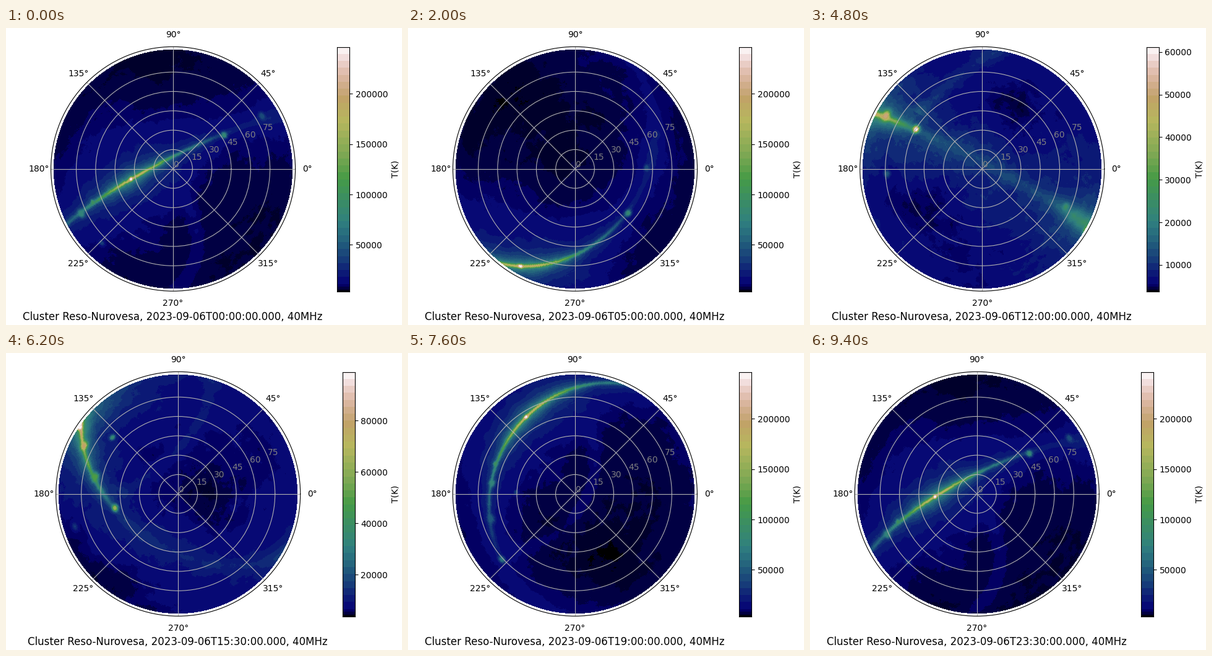
These frames come from a looping animation (640x480 px, 9.6 s). A matplotlib script:

```python
import numpy as np
import matplotlib.pyplot as plt
from matplotlib.animation import FuncAnimation
from matplotlib.colors import ListedColormap
from matplotlib.ticker import MaxNLocator

W, H, DPI = 640, 480, 100
FRAMES, STEP_MS = 48, 200
LAT = np.radians(3.5)
LST0 = 18.33            # sidereal hour of the first frame
PX_PER_DEG = 2.087
CENTER_Y, AXES_R, DISK_R = 227.75, 197.5, 193.2
SIDE = 388              # pixels across the sky image
T_MIN, T_MAX = 3800, 246700
GRID = 720              # columns of the sky map, half a degree each

# Contour bands as fractions of the temperature range: fine at the cold end.
EDGES = np.concatenate([[0, 0.0039, 0.0098, 0.0195], np.linspace(0.03, 1, 35)])
PALETTE = plt.get_cmap("gist_earth")((EDGES[1:] + EDGES[:-1]) / 2)

# Directions of the galactic pole and centre: right ascension, declination.
POLE, CORE = (192.86, 27.13), (266.4, -28.94)

# Compact sources: right ascension (h), declination, peak (K), width (deg).
SOURCES = [(17.76, -29, T_MAX, 0.9), (15.75, -56, 99000, 0.9),
           (14.3, -60.5, 79000, 1.5), (20.5, 40.8, 81400, 1.5),
           (8.97, -45, 61200, 1.5), (11.3, -59.8, 50000, 1.8),
           (23.45, 58.8, 45000, 1.4), (13.5, -42.2, 36000, 1.2)]


def unit(lon, lat):
    """Unit vectors for angles in degrees."""
    lon, lat = np.radians(lon), np.radians(lat)
    return np.stack([np.cos(lat) * np.cos(lon), np.cos(lat) * np.sin(lon),
                     np.sin(lat) + 0 * lon], axis=-1)


def distance(vecs, center):
    return np.degrees(np.arccos(np.clip(vecs @ center, -1, 1)))


def bump(x, center, width):
    return np.exp(-((x - center) / width) ** 2)


def sphere_noise(vecs, rng, waves=110):
    """Isotropic ragged noise built from plane waves, unit variance."""
    total = np.zeros(vecs.shape[:-1])
    for k in np.geomspace(4, 130, waves):
        direction = rng.normal(size=3)
        direction *= k / np.linalg.norm(direction)
        total += k ** -0.4 * np.cos(vecs @ direction + rng.uniform(0, 2 * np.pi))
    return total / total.std()


def ridge_height(lon):
    """Temperature excess along the galactic plane."""
    return 1000 * (2 + 165 * bump(lon, 0, 38) + 31 * bump(np.abs(lon), 65, 22)
                   + 12 * bump(lon, 118, 28))


def build_sky():
    """Brightness temperature on a right ascension / declination grid."""
    rng = np.random.default_rng(7)
    ra, dec = np.meshgrid((np.arange(GRID) + 0.5) * 360 / GRID,
                          (np.arange(GRID // 2) + 0.5) * 360 / GRID - 90)
    eq = unit(ra, dec)
    pole, core = unit(*POLE), unit(*CORE)
    lat = 90 - distance(eq, pole)
    lon = np.degrees(np.arctan2(eq @ np.cross(pole, core), eq @ core))
    b = np.abs(lat)
    noise = np.clip(sphere_noise(eq, rng) + 0.15 * rng.normal(size=ra.shape), -2, 2)

    base = 5900 + 4800 * np.exp(-b / 21)
    base += 7400 * bump(distance(eq, core), 0, 43)
    loop = distance(eq, unit(229.5, -33) * 0 + spur_center(pole, core))
    base += 2800 * bump(loop, 57, 5) * (lat > 10)
    for hour, d in [(4.4, -33), (9.7, 24)]:
        base -= 1600 * bump(distance(eq, unit(hour * 15, d)), 0, 23)

    width = 1 + 3.5 / (1 + np.exp((100 - np.abs(lon)) / 10))
    x = b / width
    profile = 0.5 * bump(x, 0, 1.2) + 0.37 * np.exp(-x / 3.8) + 0.13 * np.exp(-b / 12)
    sky = base * (1 + 0.085 * noise) + ridge_height(lon) * profile * (1 + 0.06 * noise)

    for hour, d, peak, size in SOURCES:
        dist = distance(eq, unit(hour * 15, d))
        mix = np.minimum(1, 1.25 * np.exp(-(dist / size) ** 2 / 2))
        sky += (peak - sky) * mix
    for hour, d in [(2.7, 62), (5.8, -70)]:
        sky += 9000 * bump(distance(eq, unit(hour * 15, d)), 0, 2.2)
    return np.clip(sky, T_MIN, T_MAX)


def spur_center(pole, core):
    """Middle of the large radio loop, at galactic longitude -31, latitude 17.5."""
    x, y, z = unit(-31, 17.5)
    return x * core + y * np.cross(pole, core) + z * pole


# Hour angle and declination seen by every pixel of the disk.
offset = np.arange(SIDE) - (SIDE - 1) / 2
dx, dy = np.meshgrid(offset, -offset)
radius = np.hypot(dx, dy)
inside = radius <= DISK_R
zen, az = np.radians(radius / PX_PER_DEG), np.arctan2(dy, dx)
north = np.sin(zen) * np.cos(az)
sin_dec = np.sin(LAT) * np.cos(zen) + np.cos(LAT) * north
hour_angle = np.degrees(np.arctan2(-np.sin(zen) * np.sin(az),
                                   np.cos(LAT) * np.cos(zen) - np.sin(LAT) * north))
dec_deg = np.degrees(np.arcsin(np.clip(sin_dec, -1, 1)))
rows = np.clip(((dec_deg + 90) * GRID / 360).astype(int), 0, GRID // 2 - 1)
SKY = build_sky()

fig = plt.figure(figsize=(W / DPI, H / DPI), dpi=DPI, facecolor="white")


def box(left, top, width, height):
    """Pixel box measured from the top left, as figure fractions."""
    return [left / W, 1 - (top + height) / H, width / W, height / H]


disk_ax = fig.add_axes(box(76, 34, SIDE, SIDE))
disk_ax.axis("off")
disk = disk_ax.imshow(np.zeros((SIDE, SIDE, 4)), interpolation="nearest", aspect="auto")

polar = fig.add_axes(box(72, 30, 2 * AXES_R, 2 * AXES_R), projection="polar")
polar.set_facecolor("none")
polar.set_rlim(0, AXES_R / PX_PER_DEG)
polar.set_yticks(range(0, 90, 15))
polar.tick_params(axis="y", colors="gray")

bar = fig.add_axes(box(535, 31, 20, 395))
bar.pcolormesh([0, 1], EDGES, np.arange(len(PALETTE))[:, None],
               cmap=ListedColormap(PALETTE))
bar.set_xticks([])
bar.set_ylim(0, 1)
bar.yaxis.tick_right()
bar.yaxis.set_label_position("right")
bar.set_ylabel("T(K)")

caption = fig.text(0, 8 / H, "", fontsize=12, ha="center", va="baseline")
locator = MaxNLocator(9, steps=[1, 2, 2.5, 5, 10])


def place(wide_labels, drift):
    """Shift the plot left when the colour bar needs six-digit labels."""
    cx, bar_x = (270.1, 534.9) if wide_labels else (278.4, 543.7)
    cx -= drift
    disk_ax.set_position(box(int(cx + 0.5) - SIDE / 2, 228 - SIDE / 2, SIDE, SIDE))
    polar.set_position(box(cx - AXES_R, CENTER_Y - AXES_R, 2 * AXES_R, 2 * AXES_R))
    bar.set_position(box(bar_x, CENTER_Y + 0.25 - AXES_R, 20, 2 * AXES_R))
    caption.set_x((cx - 0.5) / W)


def draw(n):
    lst = (LST0 + n / 2 * 1.00274) * 15
    cols = ((lst - hour_angle) % 360 * GRID / 360).astype(int) % GRID
    temp = SKY[rows, cols]
    t_max = temp[inside].max()
    span = t_max - T_MIN

    band = np.searchsorted(EDGES, (temp - T_MIN) / span, side="right") - 1
    image = PALETTE[np.clip(band, 0, len(PALETTE) - 1)]
    image[..., 3] = inside
    disk.set_data(image)

    ticks = [t for t in locator.tick_values(T_MIN, t_max) if T_MIN <= t <= t_max]
    bar.set_yticks([(t - T_MIN) / span for t in ticks], [f"{t:.0f}" for t in ticks])
    place(t_max >= 100000, 0.3 * n / FRAMES)
    caption.set_text("Cluster Reso-Nurovesa, "
                     f"2023-09-06T{n // 2:02d}:{n % 2 * 30:02d}:00.000, 40MHz")
    return disk, caption


# The loop centre helper is resolved at call time, so every frame is stateless.
anim = FuncAnimation(fig, draw, frames=FRAMES, interval=STEP_MS,
                     repeat=True, repeat_delay=0, blit=False)
plt.show()
```
